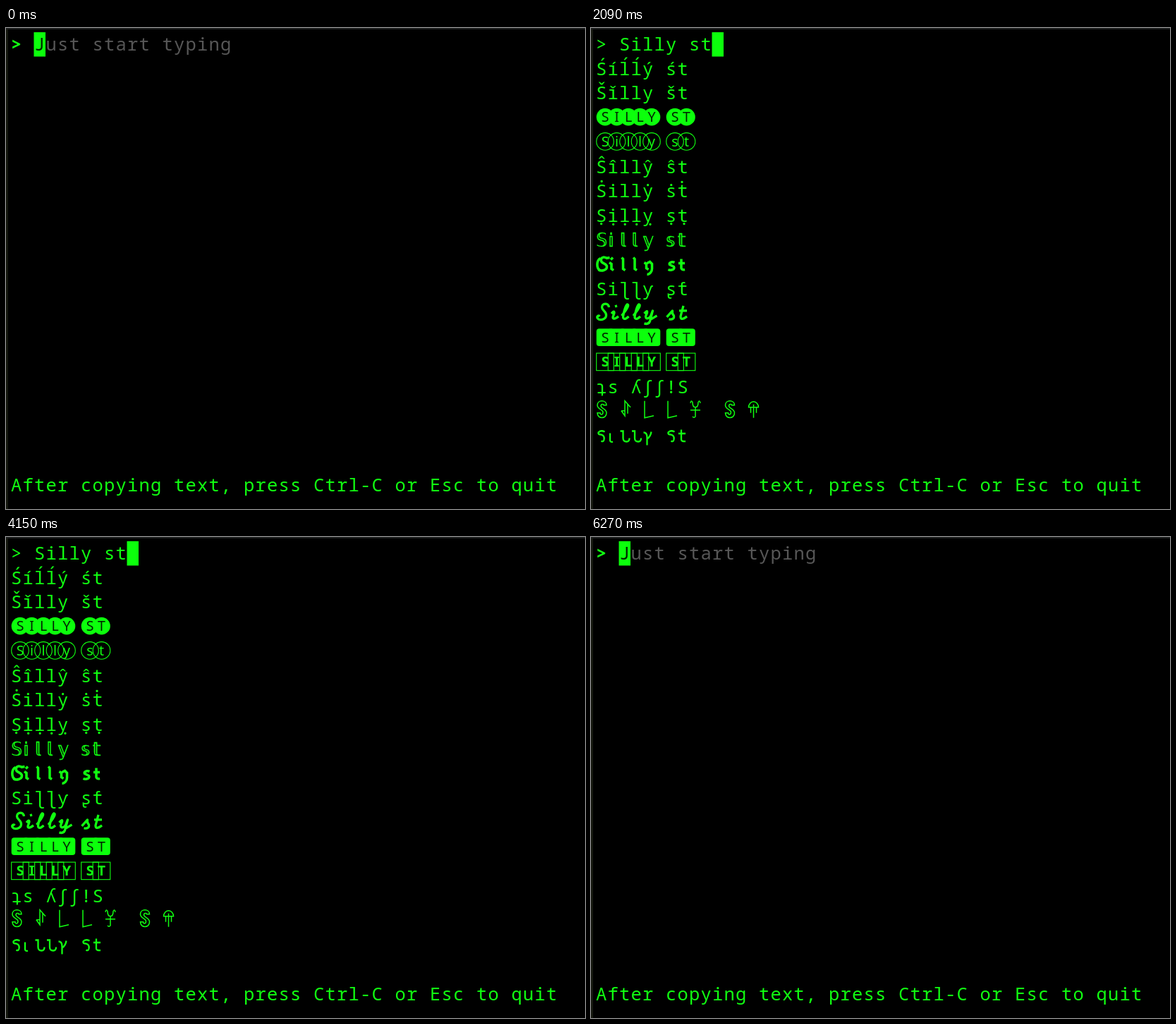
Recreate the animation shown at these times as an HTML page. Size 821 by 682 pixels, loop 6.65 s.

```html
<!DOCTYPE html>
<html lang="en">
<head>
<meta charset="utf-8">
<title>Text styler</title>
<style>
html, body { margin: 0; width: 100%; height: 100%; overflow: hidden; background: #000; }
svg { display: block; width: 821px; height: 682px; }
text { font: 25.5px 'Noto Sans Mono', 'DejaVu Sans Mono', monospace; fill: #1f1; text-anchor: middle; white-space: pre; }
.hint { fill: #575757; }
.inv { fill: #020; }
.wide { font: 26px 'DejaVu Sans', sans-serif; text-anchor: start; stroke: #1f1; stroke-width: .3; }
.badge { font: 500 19.5px 'Noto Sans', sans-serif; }
.bold { font-weight: 600; }
.solid { fill: #0cff0c; }
.frame { fill: none; stroke: #1f1; stroke-width: 1.1; }
.line { fill: none; stroke: #1f1; stroke-width: 1.5; }
.nib { fill: none; stroke: #1f1; stroke-width: 3.5; }
.brush { fill: none; stroke: #1f1; stroke-width: 3.3; stroke-linejoin: round; }
.pen { fill: none; stroke: #1f1; stroke-width: 2.3; }
</style>
</head>
<body>
<svg viewBox="0 0 821 682">
  <rect width="821" height="682" fill="#000"/>
  <rect width="3" height="682" fill="#15170f"/>
  <rect width="821" height="2" fill="#1c1e1e"/>
  <g id="screen"></g>
</svg>
<script>
const LOOP = 6650, CELL = 16.5, LEFT = 6.5;
const PHRASE = 'Silly string';
const KEYS = [520, 750, 1050, 1170, 1350, 1710, 1930, 2090, 2180, 2280, 2380, 2530];
const ERASE = 3580, REPEAT_FROM = 4080, REPEAT = 30;

const FROM = 'Silytrnsg';
const STYLES = {
  acute: 'Śíĺýtŕńśǵ',
  caron: 'Šǐlytřňšǧ',
  hat: 'Ŝîlŷtrnŝĝ',
  dotOver: 'Ṡilẏṫṙṅṡġ',
  dotUnder: 'Ṣịḷỵṭṛṇṣg',
  hook: 'Siɭƴƭɽɳʂɠ',
  flip: 'S!ʃʎʇɹusƃ',
  struck: '𝕊𝕚𝕝𝕪𝕥𝕣𝕟𝕤𝕘'
};

const FRAKTUR = {
  S: 'M16 -18C11 -21 7 -19 8 -14C9 -10 16 -11 16 -6C16 -1 8 1 4 -2M7 -18C1 -15 1 -4 6 -1M15 -18L20 -19',
  i: 'M3 -12L6 -10V-3L9 -1M5 -16L8 -19',
  l: 'M4 -19L6 -17V-3L9 -1',
  y: 'M3 -12L6 -10V-4L9 -2M7 -11L11 -13L14 -10V-3C14 2 10 5 7 5',
  s: 'M13 -12C8 -14 5 -11 6 -9L12 -6C14 -2 8 0 4 -2',
  t: 'M6 -17V-4Q7 -1 11 -2M2 -11H11',
  r: 'M3 -11L6 -10V-1H9M6 -9L11 -13L14 -11',
  n: 'M3 -12L6 -10V-1M6 -9L11 -13L14 -11V-3L17 -1',
  g: 'M12 -11C6 -13 3 -10 4 -5C5 -1 9 -2 12 -4M12 -12V0C12 4 8 6 4 4'
};
const SCRIPT = {
  S: 'M19 -18C18 -25 9 -24 9 -18C9 -13 16 -12 15 -6C14 0 5 1 3 -2C1 -5 4 -7 6 -5',
  i: 'M6 -9Q10 -14 10 -10L8 -4Q8 1 16 -5M11 -19L14 -20',
  l: 'M4 -6L10 -14Q15 -21 12 -22Q9 -21 6 -5Q6 2 14 -5',
  y: 'M3 -9Q8 -15 7 -10L5 -5Q6 1 12 -5L15 -13L11 2Q9 7 3 5M11 0L21 -6',
  s: 'M2 -4L10 -13Q9 -9 12 -6Q13 0 5 -1',
  t: 'M9 -20L5 -5Q5 2 14 -5M3 -13H14',
  r: 'M3 -6L7 -14Q8 -11 14 -12L11 -4Q11 1 18 -5',
  n: 'M4 0L8 -13M6 -6Q15 -16 15 -10L12 -4Q12 1 22 -5',
  g: 'M14 -12Q5 -14 4 -6Q5 1 12 -6L14 -13L10 3Q8 8 2 5M11 0L19 -6'
};
const RUNE_S = 'M6 -18C6 -26 -7 -26 -7 -18C-7 -12 1 -12 1 -8C1 -4 -3 -4 -3 -7H-7C-7 2 6 2 6 -7C6 -13 -2 -13 -2 -17C-2 -20 2 -20 2 -18Z';
const RUNES = {
  S: RUNE_S, s: RUNE_S,
  i: 'M-6 -10L-1 -3V-24L7 -15M3 -19V-6M-6 -10H-1',
  l: 'M-6 -24V0L7 -3',
  y: 'M-7 -21Q-6 -26 -4 -22Q-4 -15 0 -15Q4 -15 4 -22Q6 -26 7 -21M0 -15V-2Q-2 1 -4 -2M-7 -11H7',
  t: 'M-7 -15A7 8 0 0 1 7 -15ZM0 -19V0M-4 -15V-7M4 -15V-7',
  r: 'M-6 -24H6L-3 -14L6 0M-3 -24V0',
  n: 'M-6 0V-20M-7 -24L7 0M7 -24V-5',
  g: 'M6 -20Q0 -26 -5 -18V-5Q0 2 6 -4V-11H0'
};
const LOOPED_S = 'M13 -15Q7 -18 4 -14Q3 -11 8 -11Q13 -10 12 -4Q11 0 8 -2';
const LOOPED = {
  S: LOOPED_S, s: LOOPED_S,
  i: 'M4 -13V-3Q4 0 8 -1',
  l: 'M2 -16H6V-6Q6 -1 11 -1Q15 -1 15 -6',
  y: 'M2 -14Q7 -14 7 -7V4M7 -5Q12 -8 13 -15',
  t: 'M6 -18V-4Q6 -1 12 -1.5M2 -12.5H12',
  r: 'M3 -2V-9Q3 -17 8 -17Q14 -17 14 -10',
  n: 'M3 -11L6 -14Q13 -17 14 -10V0M3 -11Q6 -10 5 -6V-2a2 2 0 1 0 -2 1',
  g: 'M12 -12a4 4 0 1 0 0 6M12 -14V0Q11 5 4 4'
};

const colX = c => LEFT + c * CELL;
const baseline = row => 32 + row * 34.72;

// One glyph per terminal cell, placed on the grid.
function cells(str, y, cls = '', dx = CELL / 2, col = 0) {
  return [...str].map((ch, i) => ch === ' ' ? '' :
    `<text class="${cls}" x="${colX(i + col) + dx}" y="${y}">${ch === '>' ? '&gt;' : ch}</text>`).join('');
}

function restyle(str, name) {
  const to = [...STYLES[name]];
  return [...str].map(ch => ch === ' ' ? ch : to[FROM.indexOf(ch)]).join('');
}

function drawn(str, row, glyphs, cls) {
  return [...str].map((ch, c) => ch === ' ' ? '' :
    `<path class="${cls}" transform="translate(${colX(c)} ${baseline(row)})" d="${glyphs[ch]}"/>`).join('');
}

function runes(str, row) {
  let x = 16, out = '';
  for (const ch of str) {
    if (ch === ' ') { x += CELL; continue; }
    out += `<path class="line" transform="translate(${x} ${baseline(row)})" d="${RUNES[ch]}"/>`;
    x += 2 * CELL;
  }
  return out;
}

function badges(str, row, shape, cls, textCls) {
  const y = baseline(row) - 10, r = 12.3;
  const frames = [...str].map((ch, c) => {
    const x = colX(c) + 13.5;
    if (ch === ' ') return '';
    return shape === 'circle'
      ? `<circle class="${cls}" cx="${x}" cy="${y}" r="${r}"/>`
      : `<rect class="${cls}" x="${x - r}" y="${y - r}" width="${2 * r}" height="${2 * r}" rx="${cls === 'solid' ? 4 : 0}"/>`;
  }).join('');
  return frames + cells(str, y + 7, 'badge ' + textCls, 13.5);
}

function rows(s) {
  const up = s.toUpperCase();
  const plain = (row, name) => cells(restyle(s, name), baseline(row));
  return [
    plain(1, 'acute'),
    plain(2, 'caron'),
    badges(up, 3, 'circle', 'solid', 'inv'),
    badges(s, 4, 'circle', 'frame', ''),
    plain(5, 'hat'),
    plain(6, 'dotOver'),
    plain(7, 'dotUnder'),
    cells(restyle(s, 'struck'), baseline(8), 'wide', 0.5),
    drawn(s, 9, FRAKTUR, 'nib'),
    plain(10, 'hook'),
    drawn(s, 11, SCRIPT, 'brush'),
    badges(up, 12, 'rect', 'solid', 'inv'),
    badges(up, 13, 'rect', 'frame', 'bold'),
    cells([...restyle(s, 'flip')].reverse().join(''), baseline(14)),
    runes(s, 15),
    drawn(s, 16, LOOPED, 'pen')
  ].join('');
}

function typedLength(t) {
  if (t < ERASE) return KEYS.filter(k => k <= t).length;
  const repeats = t < REPEAT_FROM ? 0 : 1 + Math.floor((t - REPEAT_FROM) / REPEAT);
  return Math.max(0, PHRASE.length - 1 - repeats);
}

function screenAt(n) {
  const s = PHRASE.slice(0, n), y = baseline(0);
  const cursor = `<rect class="solid" x="${colX(n + 2)}" y="6" width="16.5" height="34.5"/>`;
  const line = n
    ? cells('> ' + s, y) + rows(s)
    : cells('>', y, 'bold') + cells('J', y, 'inv', CELL / 2, 2) + cells('ust start typing', y, 'hint', CELL / 2, 3);
  return cursor + line + cells('After copying text, press Ctrl-C or Esc to quit', baseline(18));
}

const screen = document.getElementById('screen');
let shown = -1;

function render(t) {
  const n = typedLength(t);
  if (n === shown) return;
  shown = n;
  screen.innerHTML = screenAt(n);
}

const start = performance.now();
function tick() {
  render((performance.now() - start) % LOOP);
  requestAnimationFrame(tick);
}
tick();
</script>
</body>
</html>
```
